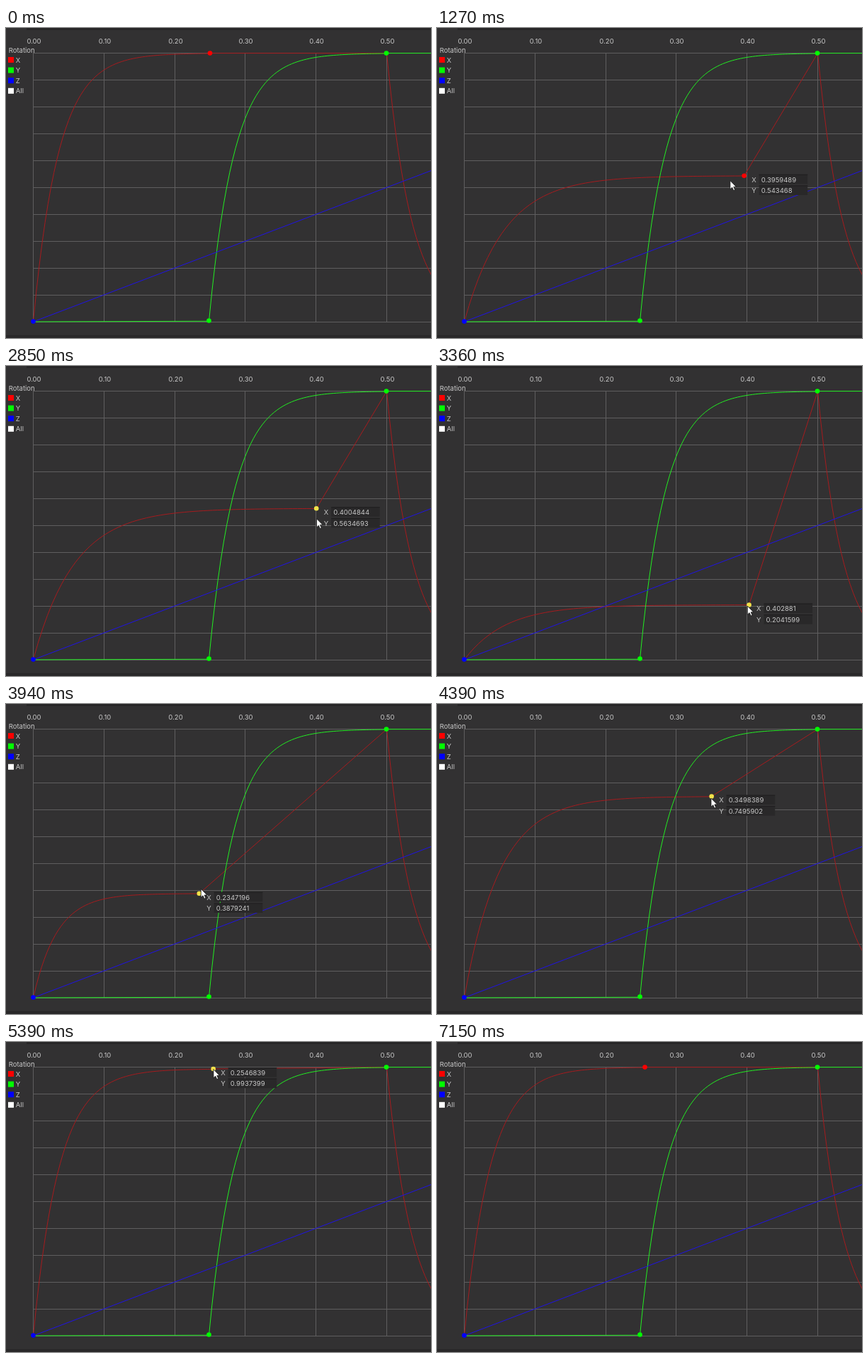
An HTML page that plays this animation: 600 by 438 pixels, repeating every 7.24 s.

```html
<!DOCTYPE html>
<html lang="en">
<head>
<meta charset="utf-8">
<title>Rotation curves</title>
<style>
  html, body { margin: 0; width: 100%; height: 100%; overflow: hidden; background: #323132; }
  svg { display: block; width: 600px; height: 438px; }
  text { font: 9.5px Inter, Roboto, sans-serif; fill: #c8c8c8; white-space: pre; }
  .curve { fill: none; stroke-width: 1; }
  .grid { stroke: #5f5e5f; stroke-width: 1; shape-rendering: crispEdges; }
</style>
</head>
<body>
<svg id="stage" viewBox="0 0 600 438" xmlns="http://www.w3.org/2000/svg"></svg>
<script>
const LOOP = 7240;
const stage = document.getElementById('stage');

// Curve space to stage pixels
const X0 = 38.5, Y0 = 415, W = 998, H = 379.4;
const px = v => X0 + v * W;
const py = v => Y0 - v * H;

function add(tag, attrs, parent = stage) {
  const el = document.createElementNS('http://www.w3.org/2000/svg', tag);
  for (const k in attrs) el.setAttribute(k, attrs[k]);
  parent.appendChild(el);
  return el;
}
function label(str, x, y, anchor = 'start', parent = stage) {
  const el = add('text', { x, y, 'text-anchor': anchor }, parent);
  el.textContent = str;
  return el;
}
const rect = (x, y, width, height, fill, parent) => add('rect', { x, y, width, height, fill }, parent);
const dot = (x, y, fill) => add('circle', { cx: x, cy: y, r: 3.3, fill });
const curve = (stroke, d = '') => add('path', { class: 'curve', stroke, d });

// Exponential ease-out between two curve keys, as path points
function expoOut(ax, ay, bx, by) {
  let d = '';
  for (let i = 0; i <= 60; i++) {
    const u = i / 60;
    const e = u === 1 ? 1 : 1 - 2 ** (-10 * u);
    d += `L${px(ax + (bx - ax) * u).toFixed(2)} ${py(ay + (by - ay) * e).toFixed(2)}`;
  }
  return d;
}

// Window edges
rect(29, 0, 571, 3, '#272627');
rect(0, 434, 600, 4, '#292829');

// Grid and rulers
for (let i = 0; i <= 5; i++) {
  const x = Math.floor(px(i / 10)) + 0.5;
  add('line', { class: 'grid', x1: x, x2: x, y1: 35, y2: 416 });
  label((i / 10).toFixed(2), x + 1, 22.3, 'middle');
}
for (let i = 0; i <= 10; i++) {
  const y = Math.floor(py(i / 10)) + 0.5;
  add('line', { class: 'grid', x1: 38, x2: 600, y1: y, y2: y });
}

// Legend
label('Rotation', 3.8, 35);
[['X', '#f00'], ['Y', '#0f0'], ['Z', '#00f'], ['All', '#fff']].forEach(([name, color], i) => {
  rect(3, 41 + i * 14.6, 8, 8, color);
  label(name, 13.8, 48.6 + i * 14.6);
});

// Curves
const red = curve('#a61b1e');
const G = 0.2485;
curve('#22ee22', `M${X0} ${py(0)}` + expoOut(G, 0.002, 0.5, 1) + 'H600');
curve('#1f12e6', `M${X0} ${Y0}L${px(1)} ${py(1)}`);
const tail = expoOut(0.5, 1, 0.75, 0);

const keyDot = dot(0, 0, '#f00');
dot(px(G), py(0.004), '#0f0');
dot(px(0.5) - 0.5, py(1), '#0f0');
dot(X0, py(0.001), '#00f');

// Value fields
const tip = add('g', {});
const fields = ['X', 'Y'].map((name, i) => {
  const y = i * 15.6;
  rect(21, y - 2, 68.5, 13.6, '#292829', tip);
  rect(21, y - 2, 68.5, 1, '#1f1e1f', tip);
  label(name, 10.5, y + 8.7, 'start', tip);
  return label('', 24, y + 8.7, 'start', tip);
});

const cursor = add('path', {
  d: 'M0 0V12.2L2.8 9.6L4.8 14L6.8 13.1L4.9 8.8H8.6Z',
  fill: '#fff', stroke: '#111', 'stroke-width': 0.8, 'stroke-linejoin': 'round'
});

// Turning points of the drag: time, key x, key y
const DRAG = [
  [450, 0.25, 1], [1100, 0.44, 0.6], [1750, 0.18, 0.45],
  [2300, 0.2477732, 0.9149838], [2800, 0.4, 0.6], [3360, 0.402881, 0.2041599],
  [3940, 0.2347196, 0.3879241], [4400, 0.35, 0.75], [4840, 0.2775, 0.6125],
  [5390, 0.2546839, 0.9937399], [5500, 0.2555, 1]
];
const START = 450, END = 5500;
const between = (t, a, b) => t >= a && t < b;

// Monotone cubic through one column of the turning points
function dragged(time, c) {
  const t = Math.min(Math.max(time, START), END);
  const slope = i => DRAG[i] && DRAG[i + 1]
    ? (DRAG[i + 1][c] - DRAG[i][c]) / (DRAG[i + 1][0] - DRAG[i][0]) : 0;
  const tangent = i => {
    const a = slope(i - 1), b = slope(i);
    return a * b > 0 ? 2 * a * b / (a + b) : 0;
  };
  let i = 0;
  while (i < DRAG.length - 2 && t >= DRAG[i + 1][0]) i++;
  const [p, q] = [DRAG[i], DRAG[i + 1]];
  const h = q[0] - p[0], u = (t - p[0]) / h, v = 1 - u;
  return p[c] * (1 + 2 * u) * v * v + q[c] * u * u * (3 - 2 * u)
    + h * u * v * (tangent(i) * v - tangent(i + 1) * u);
}

function ease(u) {
  const k = Math.min(Math.max(u, 0), 1);
  return k * k * (3 - 2 * k);
}

function draw(time) {
  const t = Math.floor(time / 10) * 10;
  const kx = dragged(t, 1), ky = dragged(t, 2);
  const x = px(kx), y = py(ky);

  red.setAttribute('d', `M${X0} ${Y0}` + expoOut(0, 0, kx, ky) + tail);
  keyDot.setAttribute('cx', x);
  keyDot.setAttribute('cy', y);
  keyDot.setAttribute('fill', between(t, 2330, END) ? '#f2e24a' : '#f00');

  const released = between(t, 4780, 4930);
  tip.style.display = between(t, START, END) && !released ? '' : 'none';
  tip.setAttribute('transform', `translate(${x} ${y})`);
  [kx, ky].forEach((v, i) => { fields[i].textContent = +v.toPrecision(7); });

  // The pointer runs slightly ahead of the key, and comes and goes at the right
  const away = 1 - ease((t - 30) / 400) + ease((t - END) / 380);
  const cx = px(dragged(t + 40, 1)) + away * 305;
  const cy = py(dragged(t + 40, 2)) + 2 + away * 90;
  cursor.style.display = between(t, 30, 5880) ? '' : 'none';
  cursor.setAttribute('transform', `translate(${cx} ${cy})`);
}

const begin = performance.now();
function tick() {
  draw((performance.now() - begin) % LOOP);
  requestAnimationFrame(tick);
}
tick();
</script>
</body>
</html>
```
